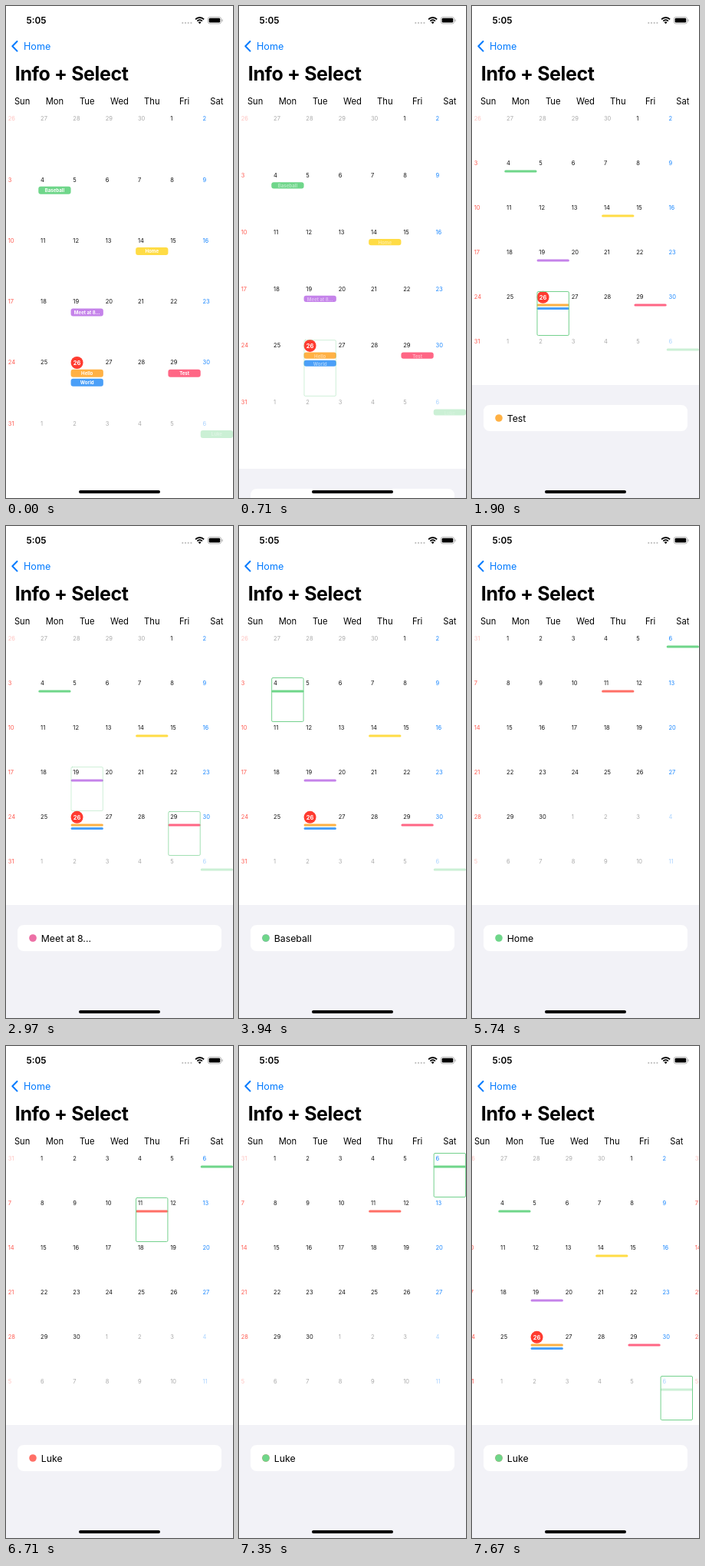
Write an HTML page with a canvas that moves like this. It is 296 by 640 pixels and loops after 8000 ms.

```html
<!DOCTYPE html>
<html lang="en">
<head>
<meta charset="utf-8">
<title>Calendar</title>
<style>
  html, body { margin: 0; width: 100%; height: 100%; overflow: hidden; background: #fff; }
  canvas { display: block; width: 296px; height: 640px; }
</style>
</head>
<body>
<canvas id="stage"></canvas>
<script>
const W = 296, H = 640, LOOP = 8000;
const COL = W / 7, GRID_TOP = 139;
const FONT = 'Inter, Roboto, sans-serif';
const BLUE = '#007aff', GREEN = '#6fd68a', RED = '#ff3b30';
const WEEKDAYS = ['Sun', 'Mon', 'Tue', 'Wed', 'Thu', 'Fri', 'Sat'];

// Days are counted from the first cell of the May page (April 26).
const TODAY = 30;
const PAGES = [{ first: 0, month: 5 }, { first: 35, month: 6 }];
const EVENTS = {
  8: [['Baseball', GREEN]],
  18: [['Home', '#ffdc45']],
  23: [['Meet at 8...', '#c583ea']],
  30: [['Hello', '#ffb144'], ['World', '#4a9ff8']],
  33: [['Test', '#ff6685']],
  41: [['Luke', GREEN]],
  46: [['Home', '#ff6f66']]
};
const TAPS = [
  { from: 500, to: 830, day: 30 },
  { from: 1900, to: 2210, day: 33 },
  { from: 2760, to: 3080, day: 23 },
  { from: 3630, to: 3940, day: 8 },
  { from: 5740, to: 6070, day: 46 },
  { from: 6710, to: 7020, day: 41 }
];

const canvas = document.getElementById('stage');
const ctx = canvas.getContext('2d');
const ratio = window.devicePixelRatio || 1;
canvas.width = W * ratio;
canvas.height = H * ratio;

const lerp = (a, b, p) => a + (b - a) * p;
const smooth = p => p * p * (3 - 2 * p);
const spring = x => 1 - (1 + x) * Math.exp(-x);

// Motion is shown in three held increments per transition.
function progress(t, from, to) {
  const p = Math.max(0, Math.min(1, (t - from) / (to - from)));
  return Math.floor(p * 3 + 1e-6) / 3;
}

function text(str, x, y, size, color = '#000', weight = 400, align = 'left', spacing = 0) {
  ctx.font = `${weight} ${size}px ${FONT}`;
  ctx.letterSpacing = spacing + 'px';
  ctx.textAlign = align;
  ctx.fillStyle = color;
  ctx.fillText(str, x, y);
}

function box(x, y, w, h, r, color) {
  ctx.fillStyle = color;
  ctx.beginPath();
  ctx.roundRect(x, y, w, h, r);
  ctx.fill();
}

function disc(x, y, r, color) {
  ctx.fillStyle = color;
  ctx.beginPath();
  ctx.arc(x, y, r, 0, Math.PI * 2);
  ctx.fill();
}

function line(points, color, width) {
  ctx.strokeStyle = color;
  ctx.lineWidth = width;
  ctx.lineCap = ctx.lineJoin = 'round';
  ctx.beginPath();
  points.forEach(([x, y]) => ctx.lineTo(x, y));
  ctx.stroke();
}

function withAlpha(alpha, draw) {
  if (alpha <= 0) return;
  ctx.save();
  ctx.globalAlpha *= alpha;
  draw();
  ctx.restore();
}

function dateOf(day) {
  if (day < 5) return { month: 4, date: day + 26 };
  if (day < 36) return { month: 5, date: day - 4 };
  if (day < 66) return { month: 6, date: day - 35 };
  return { month: 7, date: day - 65 };
}

function swipe(t) {
  if (t < 4310) return 0;
  if (t < 4900) return spring(0.02394 * (20 + 310 * progress(t, 4310, 4620)));
  if (t < 7350) return 1;
  return 1 - spring(0.01712 * 320 * progress(t, 7350, 7670));
}

function selection(t) {
  const index = TAPS.findLastIndex(tap => t >= tap.from);
  if (index < 0) return { current: null, previous: null, fade: 0 };
  const tap = TAPS[index];
  return {
    current: tap.day,
    previous: index ? TAPS[index - 1].day : null,
    fade: progress(t, tap.from, tap.to)
  };
}

function drawEvent([name, color], order, x, top, fold) {
  const y = top + 16.5 + order * lerp(12, 4.5, fold);
  const height = lerp(10, 3, fold);
  box(x, y, COL, height, Math.min(3, height / 2), color);
  withAlpha(1 - fold * 2, () =>
    text(name, x + COL / 2, y + 7.2, 6.1, '#fff', 700, 'center'));
}

function drawDay(day, column, top, month, fold) {
  const x = column * COL;
  const { month: ownMonth, date } = dateOf(day);
  withAlpha(ownMonth === month ? 1 : 0.36, () => {
    if (day === TODAY) {
      disc(x + 8, top + 7.8, 8, RED);
      text(date, x + 8, top + 10.5, 7.5, '#fff', 700, 'center');
    } else {
      const color = column === 0 ? '#ff5a50' : column === 6 ? '#1a87ff' : '#111';
      text(date, x + 2.8, top + 10.2, 7.5, color);
    }
    (EVENTS[day] || []).forEach((event, i) => drawEvent(event, i, x, top, fold));
  });
}

function drawPage({ first, month }, x, picked, fold) {
  const rowHeight = lerp(79.3, 58, fold);
  ctx.save();
  ctx.translate(x, 0);
  WEEKDAYS.forEach((name, i) =>
    text(name, (i + 0.5) * COL, 128, 11.2, '#000', 400, 'center'));
  for (let i = 0; i < 42; i++) {
    const day = first + i, column = i % 7;
    const top = GRID_TOP + Math.floor(i / 7) * rowHeight;
    drawDay(day, column, top, month, fold);
    const alpha = day === picked.current ? picked.fade
      : day === picked.previous ? 1 - picked.fade : 0;
    withAlpha(alpha, () => {
      ctx.strokeStyle = '#74d18d';
      ctx.lineWidth = 1;
      ctx.beginPath();
      ctx.roundRect(column * COL + 0.4, top + 0.5, COL - 0.9, rowHeight - 1, 1.5);
      ctx.stroke();
    });
  }
  ctx.restore();
}

function drawPanel(picked, fold) {
  const rows = EVENTS[picked.current];
  if (!rows) return;
  ctx.save();
  ctx.translate(0, lerp(H, 493, fold));
  box(0, 0, W, 150, 0, '#f2f2f7');
  box(15, 26, 266, 34 * rows.length, 8, '#fff');
  rows.forEach(([name, color], i) => {
    const y = 43 + i * 34;
    if (i) box(46, y - 17, 235, 0.5, 0, '#c6c6c8');
    const old = EVENTS[picked.previous];
    if (old) disc(35, y, 4.8, old[0][1]);
    withAlpha(old ? picked.fade : 1, () => disc(35, y, 4.8, color));
    text(name, 45.7, y + 4.9, 12.3);
  });
  ctx.restore();
}

function drawStatusBar() {
  text('5:05', 26.5, 23, 11.8, '#000', 600);
  for (let i = 0; i < 4; i++) disc(230.3 + i * 3.7, 22, 1.1, '#bbb');

  ctx.strokeStyle = '#000';
  ctx.lineCap = 'butt';
  ctx.lineWidth = 1.8;
  for (const radius of [4.6, 7.8]) {
    ctx.beginPath();
    ctx.arc(252.6, 22.8, radius, -Math.PI * 0.75, -Math.PI * 0.25);
    ctx.stroke();
  }
  ctx.fillStyle = '#000';
  ctx.beginPath();
  ctx.moveTo(252.6, 23.2);
  ctx.arc(252.6, 23.2, 2.7, -Math.PI * 0.75, -Math.PI * 0.25);
  ctx.fill();

  ctx.strokeStyle = '#a6a6a6';
  ctx.lineWidth = 0.8;
  ctx.beginPath();
  ctx.roundRect(263.2, 14.4, 17.4, 8.6, 2.6);
  ctx.stroke();
  box(264.6, 15.8, 14.6, 5.8, 1.4, '#000');
  box(281.5, 17.2, 1.1, 3, 0.5, '#a6a6a6');
}

function drawHeading() {
  line([[14.5, 46], [8.3, 52.3], [14.5, 58.6]], BLUE, 2);
  text('Home', 23, 57, 12.6, BLUE);
  text('Info + Select', 11.8, 96.5, 25, '#000', 700, 'left', -0.4);
}

function render(t) {
  ctx.setTransform(ratio, 0, 0, ratio, 0, 0);
  ctx.fillStyle = '#fff';
  ctx.fillRect(0, 0, W, H);

  const fold = smooth(progress(t, 500, 830));
  const picked = selection(t);
  const scroll = Math.round(swipe(t) * W);
  PAGES.forEach((page, i) => drawPage(page, i * W - scroll, picked, fold));
  drawPanel(picked, fold);
  drawStatusBar();
  drawHeading();
  box(95, 630, 106, 4, 2, '#000');
}

function tick() {
  render(performance.now() % LOOP);
  requestAnimationFrame(tick);
}
tick();
</script>
</body>
</html>
```
